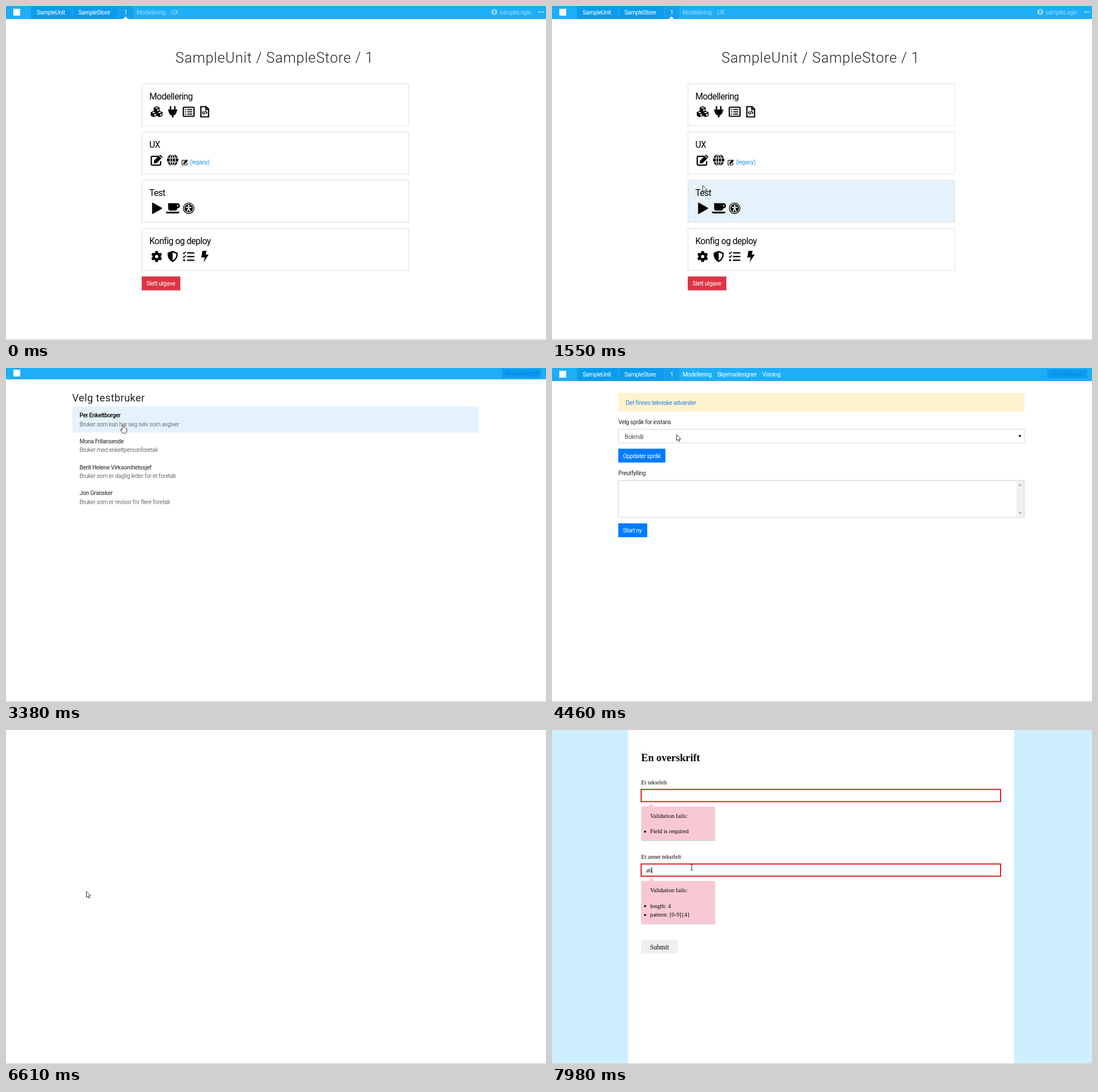
An HTML page that plays this animation: 951 px wide and 589 px high, repeating every 8000 ms.

```html
<!DOCTYPE html>
<html lang="no">
<head>
<meta charset="utf-8">
<title>Testbruker</title>
<style>
html, body { margin: 0; width: 100%; height: 100%; overflow: hidden; background: #fff; }
svg { display: block; }
text { font: 10.4px Roboto, sans-serif; letter-spacing: -.032em; white-space: pre; }
.title { font-size: 25px; font-weight: 300; letter-spacing: .85px; fill: #212529; }
.heading { font-size: 18.2px; letter-spacing: .4px; fill: #212529; }
.label { font-size: 15.6px; }
.white { fill: #fff; }
.pale { fill: #9ddafb; }
.name { font-weight: 500; fill: #495057; }
.desc { fill: #6c757d; }
.link { fill: #2196e8; }
.dark { fill: #212529; }
.line { fill: none; stroke: #000; stroke-width: 2.2; }
.gap { fill: none; stroke: #fff; stroke-width: 1.3; }
.card { fill: #fff; stroke: #dedede; }
.card.hover, .row.hover { fill: #e5f2fb; }
.row { fill: none; }
.button { fill: #007bff; }
.button.hover { fill: #0069d9; }
#final text { font-family: "Liberation Serif", serif; letter-spacing: 0; }
#final .heading { font-weight: bold; fill: #000; }
#final .submit { font-size: 11.5px; }
.loading text, .loading .mark { visibility: hidden; }
.field { fill: #fff; stroke: #999; stroke-width: 1; }
.field.focus { stroke: #4d90fe; stroke-width: 2; }
.field.error { stroke: #ee1c1c; stroke-width: 2; }
</style>
</head>
<body>
<svg width="951" height="589" viewBox="0 0 951 589">
  <g id="home"></g>
  <g id="list"></g>
  <g id="form"></g>
  <g id="final"></g>
  <rect y="588" width="951" height="1" fill="#cfcfcf"/>
  <g id="cursor">
    <path id="arrow" d="M.5.5V11.2L3 8.9 4.7 12.6 6.4 11.8 4.8 8.2H8Z" fill="#fff" stroke="#222" stroke-width=".9"/>
    <path id="hand" d="M-1.3 9V1.2Q0-.7 1.3 1.2V5Q2.4 4 3.3 5.5 4.6 4.7 5.2 6.1 6.6 5.8 6.6 7.3V11Q6.4 13 5 15H-.7Q-2.2 12.2-4.3 9.3-4.5 7.5-2.8 7.8Z" fill="#fff" stroke="#222" stroke-width=".9"/>
    <path id="beam" d="M-2.5-5H-.6L0-4.4.6-5H2.5M0-4.4V4.4M-2.5 5H-.6L0 4.4.6 5H2.5" fill="none" stroke="#222"/>
  </g>
</svg>
<script>
const LOOP = 8000;
const $ = id => document.getElementById(id);
const range = n => [...Array(n).keys()];
const text = (x, y, s, cls = '', extra = '') => `<text x="${x}" y="${y}" class="${cls}" ${extra}>${s}</text>`;
const rect = (x, y, w, h, attrs) => `<rect x="${x}" y="${y}" width="${w}" height="${h}" ${attrs}/>`;
const path = (d, attrs = '') => `<path d="${d}" ${attrs}/>`;
const circle = (x, y, r, attrs = '') => `<circle cx="${x}" cy="${y}" r="${r}" ${attrs}/>`;
const at = (x, y, s) => `<g transform="translate(${x} ${y})">${s}</g>`;
const LINE = 'class="line"', GAP = 'class="gap"';

// Icons are centred on the origin.
const cube = (x, y) => at(x, y,
  path('M0-5.5 5.2-3.2V3L0 5.6-5.2 3V-3.2Z') +
  path('M0-3.8 3.2-2.5 0-1.2-3.2-2.5ZM1 .5 3.7-.7V2.2L1 3.5Z', 'fill="#fff"'));
const pen = path('M6-6.5H-7.5Q-9.5-6.5-9.5-4.5V7Q-9.5 9-7.5 9H5Q7 9 7 7V2', LINE) +
  path('M-4.5 1 6-9.5 10.5-5 0 5.5-5 6.2Z') + path('M4-8 9-3', GAP);
const rows = (x, w) => range(3).map(i => rect(x, -4.8 + i * 4, w, 1.8, '')).join('');

const icons = {
  cubes: cube(0, -4.3) + cube(-5.2, 4) + cube(5.2, 4),
  plug: path('M-5-10H-2.5V-4H2.5V-10H5V-4H8V-1H7Q7 5 1.5 6.5V10H-1.5V6.5Q-7 5-7-1H-8V-4H-5Z'),
  form: rect(-9.4, -8, 18.8, 16, 'rx="1.5" ' + LINE) + rows(-6.5, 2.2) + rows(-2.5, 9),
  code: path('M-6.7-9H2.5L6.8-4.7V9H-6.7ZM2-9V-4H7', LINE) +
    path('M-2-1.2-4 1.5-2 4M2-1.2 4 1.5 2 4M1-2-1 5', 'fill="none" stroke="#000" stroke-width="1.4"'),
  pen,
  globe: circle(0, 0, 10) + path('M-10-3.5H10M-10 3.5H10M0-10V10', GAP) +
    '<ellipse rx="4.7" ry="10" class="gap"/>',
  smallPen: `<g transform="scale(.53)">${pen}</g>`,
  play: path('M-8-9Q-8-10.5-6.5-9.8L9-1Q10 0 9 1L-6.5 9.8Q-8 10.5-8 9Z'),
  cup: path('M-8-9H8Q12.7-9 12.7-4.5T8 0Q8 4 4 4H-4Q-8 4-8 0ZM8-6.3V-2.7Q10.3-2.7 10.3-4.5T8-6.3Z') +
    path('M-12 6H12Q12 9 9 9H-9Q-12 9-12 6Z'),
  access: circle(0, 0, 10) + circle(0, 0, 8, GAP) + circle(0, -4.4, 1.6, 'fill="#fff"') +
    path('M-5-1.8 0-1.2 5-1.8M0-1.2V1.5M-2.5 6-.8 1H.8L2.5 6', 'fill="none" stroke="#fff" stroke-width="1.8"'),
  cog: circle(0, 0, 5.2, 'fill="none" stroke="#000" stroke-width="4.6"') +
    range(6).map(i => rect(-2.3, -9.7, 4.6, 5, `rx=".8" transform="rotate(${i * 60})"`)).join(''),
  shield: path('M0-10 9-6.5Q9.5 5.5 0 10-9.5 5.5-9-6.5Z') + path('M0-7.3 6.5-4.8Q6.5 3.6 0 7Z', 'fill="#fff"'),
  tasks: path('M-3-6.5H10M-3 0H10M-3 6.5H10', LINE) +
    path('M-10-6.5-8.3-5-5.2-8.5M-10 0-8.3 1.5-5.2-2', 'fill="none" stroke="#000" stroke-width="1.6"') + circle(-8, 6.5, 1.8),
  bolt: path('M-4-10H3.5L1.5-3.5H7L-2 10.5.2 1.8H-6Z')
};

const mark = rect(13, 5, 12, 12, 'class="white mark"');
const header = linkClass => rect(0, 0, 951, 23, 'fill="#1eaef8"') + rect(44, 0, 180, 23, 'fill="#0c9cec"') +
  rect(198, 0, 26, 23, 'fill="#159fed"') + rect(116.5, 0, 1, 23, 'fill="#2aacf2"') + rect(197.5, 0, 1, 23, 'fill="#2aacf2"') + mark +
  text(54, 14.5, 'SampleUnit', 'white') + text(127.5, 14.5, 'SampleStore', 'white') + text(208, 14.5, '1', 'white') +
  text(230, 14.5, 'Modellering', linkClass);
const userBox = (x, y, w, label) => rect(x, y, w, 15.5, 'fill="#0c9cec"') +
  text(x + w / 2, y + 11.5, label, '', 'fill="#0785ee" text-anchor="middle"');

const cards = [
  ['Modellering', ['cubes', 'plug', 'form', 'code']],
  ['UX', ['pen', 'globe']],
  ['Test', ['play', 'cup', 'access']],
  ['Konfig og deploy', ['cog', 'shield', 'tasks', 'bolt']]
];
$('home').innerHTML = header('pale') + path('M206 23 210.5 18.5 215 23Z', 'fill="#fff"') +
  text(291, 14.5, 'UX', 'pale') + circle(860, 10.5, 5.2, 'class="pale"') +
  circle(860, 9, 1.9, 'fill="#1eaef8"') + path('M856.8 13.6Q860 9.5 863.2 13.6Z', 'fill="#1eaef8"') +
  text(869, 14.5, 'sampleLogin', 'pale') + range(3).map(i => circle(938.3 + i * 3.7, 10.5, 1.4, 'class="pale"')).join('') +
  text(473, 100, 'SampleUnit / SampleStore / 1', 'title', 'text-anchor="middle"') +
  cards.map(([label, names], i) => at(0, i * 85.1,
    rect(239.5, 137, 469.5, 74, 'class="card"') + text(252.5, 165, label, 'label') +
    names.map((n, k) => at(265.3 + k * 28.2, 186.5, icons[n])).join(''))).join('') +
  at(315, 275.5, icons.smallPen) + text(324, 279, '(legacy)', 'link') +
  rect(239, 477, 68, 24.5, 'fill="#dc3545"') + text(247.3, 493, 'Slett utgave', 'white');

const users = [
  ['Per Enkeltborger', 'Bruker som kun har seg selv som avgiver'],
  ['Mona Frilansende', 'Bruker med enkeltpersonforetak'],
  ['Berit Helene Virksomhetssjef', 'Bruker som er daglig leder for et foretak'],
  ['Jon Gransker', 'Bruker som er revisor for flere foretak']
];
const ROW = 45.75;
$('list').innerHTML = rect(0, 0, 951, 20, 'fill="#1eaef8"') + at(0, -2, mark) + userBox(874, 1.5, 68, 'Ikke pålogget') +
  text(116.5, 59, 'Velg testbruker', 'heading') +
  users.map(([name, desc], i) => at(0, i * ROW,
    rect(116.7, 68, 715.3, ROW, 'class="row"') + text(129.5, 87, name, 'name') + text(129.5, 102.5, desc, 'desc'))).join('');

$('form').innerHTML = header('white') + text(291, 14.5, 'Skjemadesigner', 'white') + text(370.5, 14.5, 'Visning', 'white') +
  userBox(872, 2.5, 70.5, 'PerTestland') +
  rect(116.7, 44, 715.3, 32.7, 'fill="#fff2ce"') + text(130, 64.5, 'Det finnes tekniske advarsler', '', 'fill="#2180ea"') +
  text(116.7, 98.5, 'Velg språk for instans', 'dark') +
  rect(116, 107.2, 716.6, 25.4, 'id="ring" fill="none" stroke="#bfdeff" stroke-width="3"') +
  rect(117, 108, 714.6, 24, 'id="select" fill="#fff"') + text(128, 124.5, 'Bokmål', '', 'id="language"') +
  path('M821.5 118.3H826.5L824 122.5Z') +
  rect(116.7, 142.3, 83, 24.4, 'class="button"') + text(125, 158.5, 'Oppdater språk', 'white') +
  text(116.7, 189, 'Preutfylling', 'dark') +
  rect(117, 198.3, 714.5, 65, 'fill="#fff" stroke="#ced0d2"') + rect(818, 199, 13, 64, 'fill="#f0f0f0"') +
  path('M821.3 207.5H827.7L824.5 204ZM821.3 254H827.7L824.5 257.5Z', 'fill="#a5a3d6"') +
  rect(116.7, 274, 51, 24.4, 'class="button"') + text(125, 290, 'Start ny', 'white');

const errorBox = (y, items) => rect(157.5, y + 1.5, 130, 44 + items.length * 15.6, 'rx="1" fill="#ccc" opacity=".7"') +
  path(`M170 ${y}L175 ${y - 5} 180 ${y}Z`, 'fill="#f8c9d4"') +
  rect(157, y, 130, 44 + items.length * 15.6, 'rx="1" fill="#f8c9d4"') + text(172.7, y + 20, 'Validation fails:') +
  items.map((s, i) => circle(164, y + 44.3 + i * 15.6, 1.8) + text(172.7, y + 47.3 + i * 15.6, s)).join('');
const field = (y, id) => rect(157, y, 633, 21.5, `id="${id}" class="field"`);
$('final').innerHTML = rect(0, 0, 134, 589, 'fill="#cdefff"') + rect(814, 0, 137, 589, 'fill="#cdefff"') +
  text(157, 55, 'En overskrift', 'heading') + text(157, 95.5, 'Et tekstfelt') + field(104.8, 'field1') +
  `<g id="error1">${errorBox(135, ['Field is required'])}</g><g id="lower">` +
  text(157, 227, 'Et annet tekstfelt') + field(236.3, 'field2') + text(165.5, 250.5, '', '', 'id="typed"') +
  `<g id="error2">${errorBox(266.3, ['length: 4', 'pattern: [0-9]{4}'])}</g><g id="submit">` +
  rect(157, 370.7, 64.7, 23.5, 'fill="#efefef"') + text(189.3, 387, 'Submit', 'submit', 'text-anchor="middle"') +
  '</g></g>' + rect(0, 241.7, 1, 11, 'id="caret"');

// Pointer path: time, x, y
const track = [
  [860, 421, 28], [920, 383, 86], [1170, 383, 88], [1400, 316, 206], [1550, 265, 316], [1930, 261, 356],
  [2440, 261, 356], [2840, 250, 209], [3230, 206, 100], [4310, 206, 100], [4460, 219, 117], [4620, 219, 117],
  [4820, 214, 158], [5020, 208, 139], [5480, 208, 139], [5640, 132, 158], [5800, 132, 158], [5890, 85, 162],
  [6250, 85, 162], [6460, 141, 284], [6840, 141, 284], [6950, 205, 116], [7050, 243, 188], [7390, 243, 188],
  [7550, 250, 243], [7700, 250, 243], [7980, 246, 242], [8000, 246, 242]
];
// Pointer shape from each time on
const shapes = [
  [860, 'arrow'], [2020, 'hand'], [2290, 'arrow'], [3290, 'hand'], [4460, 'arrow'], [5560, 'hand'],
  [5800, 'arrow'], [6390, 'hand'], [6610, 'arrow'], [6910, 'beam'], [7240, 'arrow'], [7480, 'beam']
];
const pages = [[0, 'home'], [2290, 'list'], [4310, 'form'], [6610, ''], [6690, 'final']];

const current = (table, t) => (table.findLast(([start]) => start <= t) || [0, ''])[1];
const show = (id, on) => $(id).style.display = on ? '' : 'none';
function pointer(t) {
  const i = track.findIndex(k => k[0] > t);
  if (i < 1) return [-50, -50];
  const [a, b] = [track[i - 1], track[i]];
  const f = (t - a[0]) / (b[0] - a[0]);
  return [1, 2].map(k => a[k] + (b[k] - a[k]) * f);
}
const hoverable = [...document.querySelectorAll('.card, .row, .button')].map(el => {
  const box = el.getBBox(), shift = el.parentNode.transform.baseVal;
  const top = box.y + (shift.numberOfItems ? shift.getItem(0).matrix.f : 0);
  return { el, x: box.x, y: top, w: box.width, h: box.height };
});

function draw(t) {
  const page = current(pages, t), shape = current(shapes, t), [x, y] = pointer(t);
  for (const id of ['home', 'list', 'form', 'final']) show(id, id === page);
  for (const id of ['arrow', 'hand', 'beam']) show(id, id === shape);
  $('cursor').setAttribute('transform', `translate(${x} ${y})`);
  for (const { el, x: left, y: top, w, h } of hoverable) {
    const over = x >= left && x < left + w && y >= top && y < top + h && !(page === 'list' && t < 2440);
    el.classList.toggle('hover', over);
    if (el.matches('.row')) el.nextElementSibling.style.fill = over && t > 3290 ? '#000' : '';
  }

  const focused = t >= 4620 && t < 5560;
  show('ring', focused);
  $('select').setAttribute('stroke', focused ? '#80bdff' : '#ced4da');
  $('language').setAttribute('fill', focused ? '#3d8062' : '#495057');
  $('arrow').setAttribute('stroke', t >= 5020 && t < 5480 ? '#2f7040' : '#222');
  $('form').classList.toggle('loading', t >= 5800 && t < 5890);

  const error1 = t >= 7240, error2 = t >= 7550, typed = t < 7550 ? '' : t < 7780 ? 'a' : 'ab';
  show('error1', error1);
  show('error2', error2);
  $('lower').setAttribute('transform', `translate(0 ${error1 ? 0 : -60})`);
  $('submit').setAttribute('transform', `translate(0 ${error2 ? 0 : -76})`);
  $('field1').setAttribute('class', 'field ' + (error1 ? 'error' : t >= 6980 ? 'focus' : ''));
  $('field2').setAttribute('class', 'field ' + (error2 ? 'error' : t >= 7480 ? 'focus' : ''));
  $('typed').textContent = typed;
  show('caret', t >= 7480);
  $('caret').setAttribute('x', 165.5 + (page === 'final' && typed ? $('typed').getComputedTextLength() : 0));
}

function tick() {
  draw(performance.now() % LOOP);
  requestAnimationFrame(tick);
}
tick();
</script>
</body>
</html>
```
